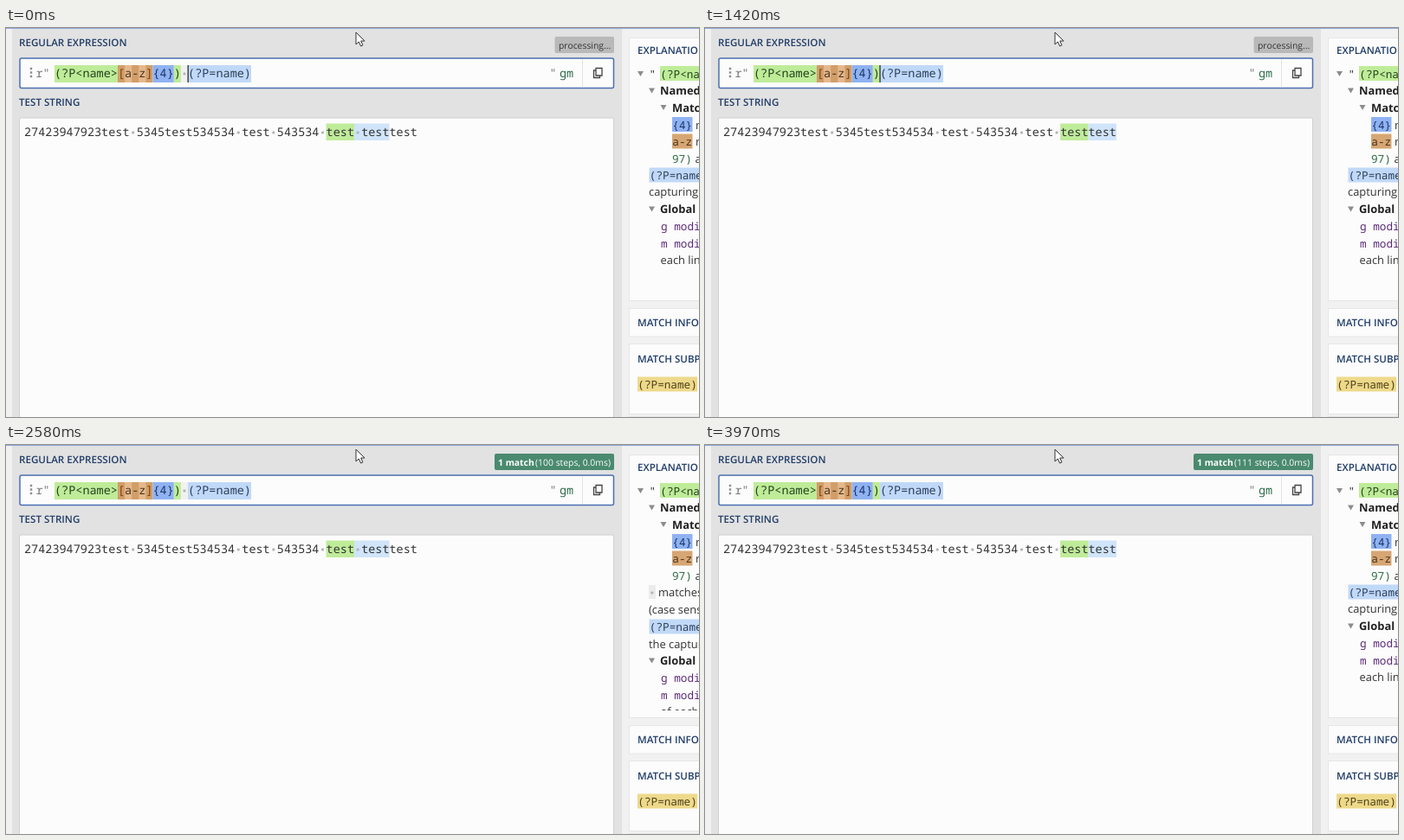
An HTML page for the animation above (4000 ms loop, 800x450 px).

```html
<!DOCTYPE html>
<html lang="en">
<head>
<meta charset="utf-8">
<title>Regex tester</title>
<style>
html, body { margin: 0; width: 100%; height: 100%; overflow: hidden; background: #efefef; }
svg { display: block; width: 800px; height: 450px; }
text { white-space: pre; text-rendering: geometricPrecision; font-family: "Open Sans", sans-serif; fill: #333; }
.mono { font-family: "Noto Sans Mono", "DejaVu Sans Mono", monospace; }
.head { font-size: 11.6px; font-weight: 600; fill: #203c68; }
.body { font-size: 12.9px; }
.bold { font-weight: 700; fill: #222; }
.tag { font-size: 10.4px; }
.light { fill: #fff; }

.spaced, .joined, .busy, .done, .long, .short, .caret { animation: 4s step-end infinite; }
.spaced { animation-name: on-spaced; }
.joined { animation-name: on-joined; }
.busy { animation-name: on-busy; }
.done { animation-name: on-done; }
.long { animation-name: on-long; }
.short { animation-name: on-short; }
.caret { animation-name: on-caret; }

/* a key is pressed at 0, 25.75, 51 and 76.75 % */
@keyframes on-spaced { 0%, 51% { opacity: 1 } 25.75%, 76.75%, 100% { opacity: 0 } }
@keyframes on-joined { 0%, 51% { opacity: 0 } 25.75%, 76.75%, 100% { opacity: 1 } }
@keyframes on-busy {
  0%, 25.75%, 51%, 76.75% { opacity: 1 }
  11%, 37%, 62.25%, 88%, 100% { opacity: 0 }
}
@keyframes on-done {
  0%, 25.75%, 51%, 76.75% { opacity: 0 }
  11%, 37%, 62.25%, 88%, 100% { opacity: 1 }
}
@keyframes on-long { 0%, 34.75%, 85.75%, 100% { opacity: 0 } 9%, 60% { opacity: 1 } }
@keyframes on-short { 0%, 34.75%, 85.75%, 100% { opacity: 1 } 9%, 60% { opacity: 0 } }
@keyframes on-caret {
  0%, 25.75%, 51%, 76.75% { opacity: 1 }
  12.5%, 38.25%, 63.5%, 89.25%, 100% { opacity: 0 }
}
</style>
</head>
<body>
<svg id="stage" viewBox="0 0 800 450"></svg>
<script>
const PITCH = 8.107, SMALL = 7.62;
const GREEN = '#bfec99', BLUE = '#c1d9f8', BRACE = '#8fb2f2', TAN = '#e5b98c', DARK_TAN = '#d19e69';
const INK = '#333', PURPLE = '#5b2a77';

const esc = s => s.replace(/&/g, '&amp;').replace(/</g, '&lt;');
const rect = (x, y, w, h, fill, more = '') =>
  `<rect x="${x}" y="${y}" width="${w}" height="${h}" fill="${fill}" ${more}/>`;
const text = (x, y, cls, s) => `<text x="${x}" y="${y}" class="${cls}">${esc(s)}</text>`;
const group = (cls, ...parts) => `<g class="${cls}">${parts.join('')}</g>`;
const arrow = (x, y) => `<path d="M${x - 3.5} ${y - 3}h7l-3.5 6z" fill="#8c8c8c"/>`;

// Monospaced run; spaces show as small dots.
function mono(x, y, s, fill = INK, pitch = PITCH) {
  let out = '';
  for (const m of s.matchAll(/ |[^ ]+/g)) {
    const left = x + m.index * pitch;
    out += m[0] === ' '
      ? rect(left + pitch / 2 - 1.5, y - 5.5, 3, 3, '#b4b4b4', 'rx="1"')
      : `<text x="${left}" y="${y}" class="mono" style="fill:${fill};font-size:${pitch / 0.6}px">${esc(m[0])}</text>`;
  }
  return out;
}
const small = (x, y, s, fill) => mono(x, y, s, fill, SMALL);
const chip = (x, y, s, bg, fill) =>
  rect(x, y - 13.5, s.length * SMALL + 0.6, 17, bg) + small(x + 0.3, y, s, fill);

function regexLine() {
  const x = 56, y = 57;
  const mark = (i, n, fill) => rect(x + i * PITCH, 43, n * PITCH, 20, fill);
  const tail = (i, cls) => group(cls, mark(i, 9, BLUE), mono(x + i * PITCH, y, '(?P=name)', '#2c3f5c'));
  const caret = (i, cls) => group(cls, rect(x + i * PITCH - 0.5, 43, 1.2, 20, '#222', 'class="caret"'));
  return mark(0, 9, GREEN) + mark(9, 5, DARK_TAN) + mark(10, 1, TAN) + mark(12, 1, TAN) +
    mark(14, 3, BRACE) + mark(17, 1, GREEN) +
    mono(x, y, '(?P<name>', '#23421c') + mono(x + 9 * PITCH, y, '[', '#7b4310') +
    mono(x + 10 * PITCH, y, 'a-z', '#4a3320') + mono(x + 13 * PITCH, y, ']', '#7b4310') +
    mono(x + 14 * PITCH, y, '{4}', '#1d3566') + mono(x + 17 * PITCH, y, ')', '#23421c') +
    group('spaced', mark(18, 1, '#f1f1f1'), mono(x + 18 * PITCH, y, ' ')) +
    tail(19, 'spaced') + tail(18, 'joined') + caret(19, 'spaced') + caret(18, 'joined');
}

function testLine() {
  const x = 21;
  const mark = (i, n, fill) => rect(x + i * PITCH, 110.5, n * PITCH, 19.5, fill);
  return group('spaced', mark(43, 4, GREEN), mark(47, 5, '#d0e4fa')) +
    group('joined', mark(48, 4, GREEN), mark(52, 4, '#d0e4fa')) +
    mono(x, 125, '27423947923test 5345test534534 test 543534 test testtest');
}

function badges() {
  const steps = (n, cls) =>
    `<g class="${cls}"><text x="698" y="23.5" text-anchor="end" class="tag light">(${n} steps, 0.0ms)</text></g>`;
  return group('busy', rect(633.5, 10, 68.5, 19, '#b9b9b9', 'rx="2"'), text(638, 23.5, 'tag', 'processing...')) +
    group('done', rect(564, 10, 138, 19, '#4a8a6f', 'rx="2"'), text(568, 23.5, 'tag bold light" style="fill:#fff', '1 match'),
      steps(100, 'spaced'), steps(111, 'joined'));
}

const globalFlags = y => arrow(745.5, y - 4.5) + text(755, y, 'body bold', 'Global pattern') +
  small(756, y + 20, 'g', PURPLE) + small(756 + 2 * SMALL, y + 20, 'modifier', PURPLE) +
  small(756, y + 39.5, 'm', PURPLE) + small(756 + 2 * SMALL, y + 39.5, 'modifier', PURPLE);

function explanation() {
  return arrow(732.5, 53) + small(742.5, 57.5, '"') + chip(755, 57.5, '(?P<name>', GREEN, '#23421c') +
    arrow(745.5, 72.5) + text(755, 77, 'body bold', 'Named') +
    arrow(759, 92) + text(769, 96.5, 'body bold', 'Match') +
    chip(769, 116.5, '{4}', BRACE, '#1d3566') + text(796, 116.5, 'body', 'matches') +
    chip(769, 136, 'a-z', '#d6a673', '#4a3320') + text(796, 136, 'body', 'matches') +
    small(769, 155.5, '97)', '#2f6b45') + text(795.5, 155.5, 'body', 'and') +
    group('short', chip(742.5, 175, '(?P=name)', BLUE, '#2c3f5c'), text(742, 194, 'body', 'capturing'),
      globalFlags(214), text(755.5, 273, 'body', 'each line')) +
    group('long', rect(742, 162, 8, 16, '#ebebeb'), small(742, 175, ' '), text(753, 175, 'body', 'matches'),
      text(742, 195, 'body', '(case sensitive)'), chip(742.5, 215, '(?P=name)', BLUE, '#2c3f5c'),
      text(742, 234.5, 'body', 'the capturing'), globalFlags(254), text(755.5, 313, 'body', 'of each line'));
}

const panel = (y, h) => rect(719.5, y, 90, h, '#fcfcfc', 'stroke="#e6e6e6"');

document.getElementById('stage').innerHTML =
  '<clipPath id="fold"><path d="M720 40h80v267h-80z"/></clipPath>' +
  rect(0, 0, 800, 450, '#f1f1f1') + rect(7, 0, 704, 450, '#e2e2e2') +
  rect(0, 0, 800, 1, '#8fa9da') +
  text(15, 20.7, 'head', 'REGULAR EXPRESSION') + text(15, 90.3, 'head', 'TEST STRING') +
  rect(16, 35, 685.5, 34.5, '#fcfcfc', 'rx="2" stroke="#4a70b0" stroke-width="1.5"') +
  rect(665, 36, 1, 33, '#e3e3e3') +
  [47, 51.5, 56].map(y => rect(27.8, y - 1.2, 2.4, 2.4, '#8a8a8a')).join('') +
  mono(34.5, 57, 'r"', '#777') + mono(627.5, 57, '"', '#777') + mono(639, 57, 'gm', '#2d6b4a') +
  '<path d="M681 46.5h7v8.5h-7zM681 49h-2.5v8.5h7v-2.5" fill="none" stroke="#444" stroke-width="1.3"/>' +
  regexLine() +
  rect(15.5, 104, 686, 360, '#fcfcfc', 'rx="2" stroke="#cfcfcf"') + testLine() + badges() +
  panel(11.5, 304) + panel(324.5, 32.5) + panel(365.5, 81) + panel(449.5, 20) +
  text(729, 30, 'head', 'EXPLANATION') + text(729, 345, 'head', 'MATCH INFORMATION') +
  text(729, 386.5, 'head', 'MATCH SUBPATTERN') +
  `<g clip-path="url(#fold)">${explanation()}</g>` +
  chip(729, 417, '(?P=name)', '#eed98b', '#4d4019') +
  '<path d="M404 5v14l3.3-3 2.3 5 2.4-1.1-2.3-4.9h4.4z" fill="#fff" stroke="#333" stroke-width="1"/>';
</script>
</body>
</html>
```
